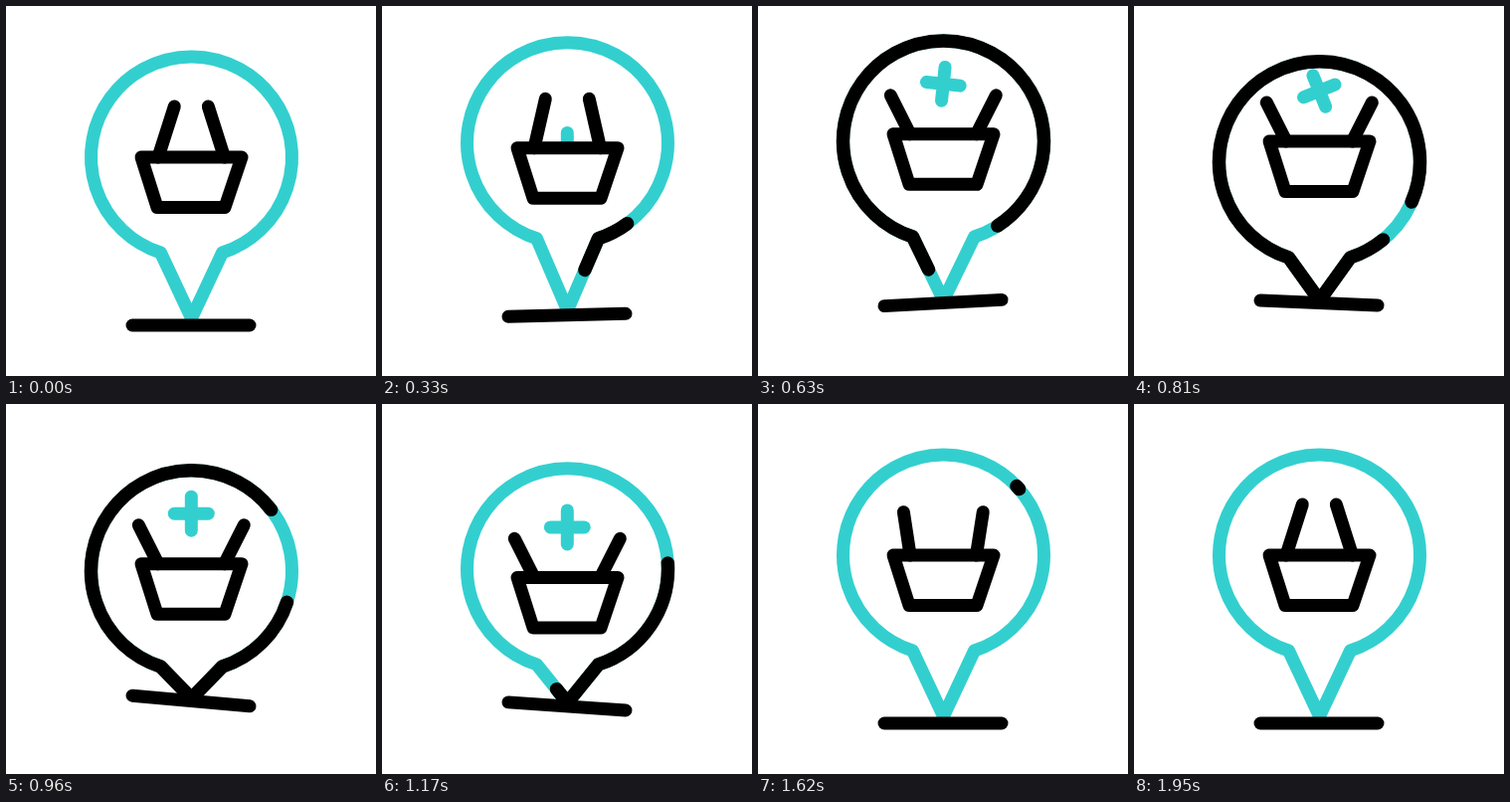
Recreate the animation shown at these times as an HTML page. Size 372 by 372 pixels, loop 2250 ms.

```html
<!DOCTYPE html>
<html>
<head>
<meta charset="utf-8">
<style>
html, body { margin: 0; width: 100%; height: 100%; overflow: hidden; background: #fff; }
svg { display: block; width: 100vw; height: 100vh; }
path { fill: none; stroke: #000; stroke-width: 13; stroke-linecap: round; stroke-linejoin: round; }
.teal { stroke: #33cfcf; }
#trace { stroke-width: 13.5; }
</style>
</head>
<body>
<svg viewBox="0 0 372 372">
  <clipPath id="aboveRim"><rect id="opening" width="372" height="372"/></clipPath>
  <path id="pin" class="teal"/>
  <path id="trace" pathLength="1"/>
  <path id="ground"/>
  <g clip-path="url(#aboveRim)"><path id="plus" class="teal" d="M0-17V17M-17 0H17"/></g>
  <path id="handles"/>
  <path id="basket" d="M136 0H237L220 50.5H152Z"/>
</svg>
<script>
const LOOP = 2250, STEP = 30, START = 90;
const set = (id, name, value) => document.getElementById(id).setAttribute(name, value);
const progress = (t, from, to) => Math.min(1, Math.max(0, (t - from) / (to - from)));

// Sine ease from 0 to 1 between two times.
const swing = (t, from, to) => (1 - Math.cos(Math.PI * progress(t, from, to))) / 2;

// Cubic Bezier easing (.6, 0, .15, 1) between two times.
function sweep(t, from, to) {
  const x = progress(t, from, to);
  let lo = 0, hi = 1, u;
  for (let i = 0; i < 20; i++) {
    u = (lo + hi) / 2;
    const w = 1 - u;
    if (1.8 * w * w * u + 0.45 * w * u * u + u * u * u < x) lo = u; else hi = u;
  }
  return u * u * (3 - 2 * u);
}

function drawPin(t) {
  const rise = swing(t, START, 600), settle = swing(t, 1020, 1480);
  const lift = 22.5 * (rise - settle);
  const tilt = -3.2 * rise + 8.5 * swing(t, 610, 940) - 5.3 * settle;
  const notch = 248 - 19 * swing(t, START, 450) + 35 * swing(t, 550, 970) - 16 * swing(t, 1065, 1510);

  const outline = `M186.5 ${314 - 0.8 * lift}L217.5 ${notch}A101 101 0 1 0 155.5 ${notch}Z`;
  set('pin', 'd', outline);
  set('trace', 'd', outline);
  set('ground', 'd', `M127 ${321 - lift - tilt}L245 ${321 - lift + tilt}`);

  const tail = sweep(t, 660, 1730), length = sweep(t, START, 1080) - tail;
  const shift = 0.403 * progress(t, START, 1690);
  set('trace', 'visibility', length > 0.0005 ? 'visible' : 'hidden');
  set('trace', 'stroke-dasharray', `${length} ${1 - length}`);
  set('trace', 'stroke-dashoffset', -(tail + shift));
}

function drawBasket(t) {
  const rim = 152 - 23.2 * swing(t, START, 640) + 45.7 * swing(t, 705, 1110) - 22.5 * swing(t, 1150, 1588);
  set('basket', 'transform', `translate(0 ${rim})`);

  const open = swing(t, 234, 630) - swing(t, 1410, 1920);
  const dx = 17 + 36 * open, top = rim - 51 + 12 * open;
  set('handles', 'd', `M153 ${rim}L${186.3 - dx} ${top}M219.5 ${rim}L${186.3 + dx} ${top}`);

  const jump = swing(t, 127, 630) - swing(t, 1360, 1710);
  set('opening', 'y', rim - 372);
  set('plus', 'transform',
    `translate(186.3 ${rim + 30 - 80.5 * jump}) rotate(${90 * swing(t, 570, 928)})`);
}

const origin = performance.now();
function tick() {
  const t = Math.floor((performance.now() - origin) % LOOP / STEP) * STEP;
  drawPin(t);
  drawBasket(t);
  requestAnimationFrame(tick);
}
tick();
</script>
</body>
</html>
```
